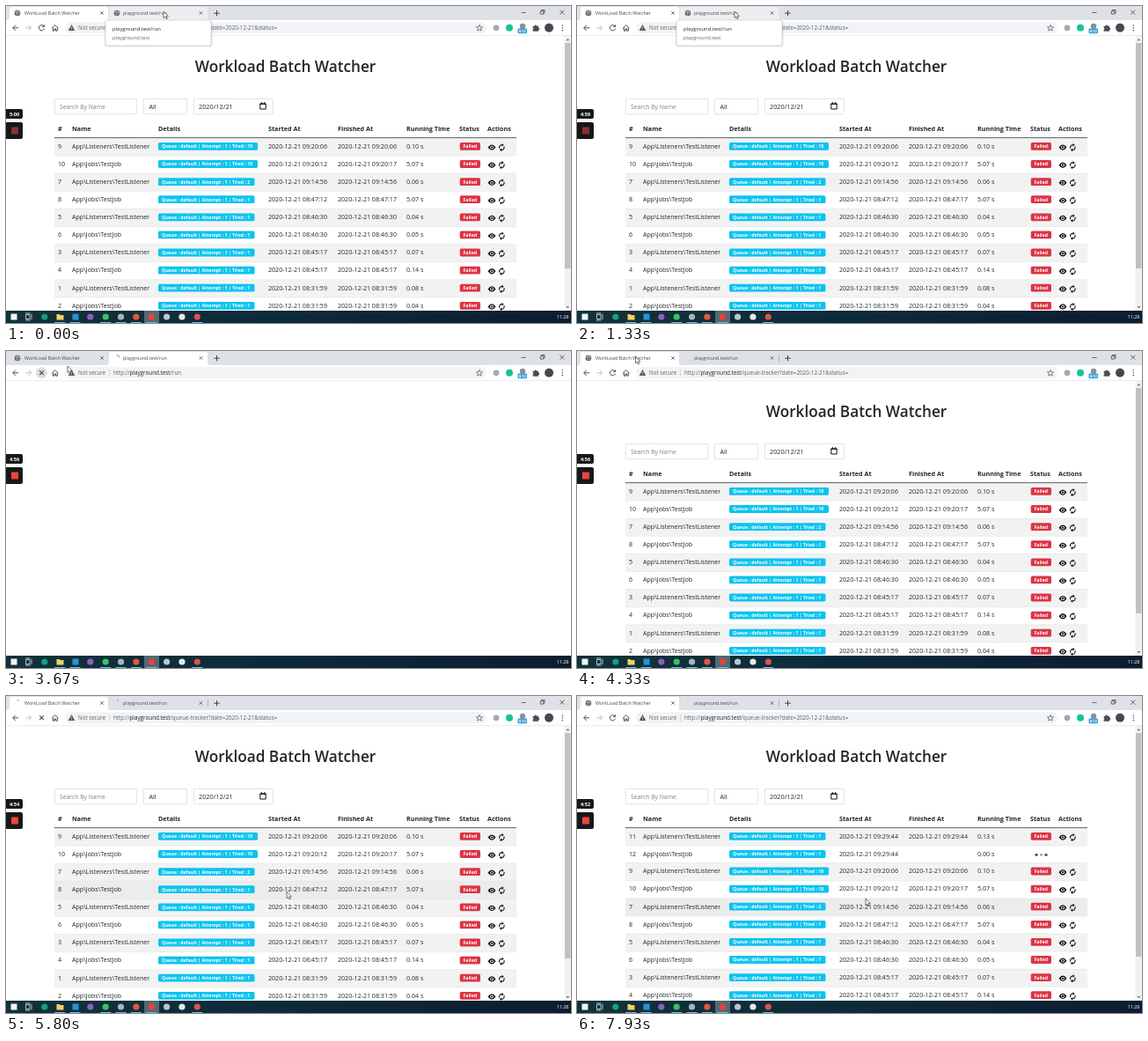
Recreate the animation shown at these times as an HTML page. Size 642 by 360 pixels, loop 8 s.

```html
<!DOCTYPE html>
<html lang="en">
<head>
<meta charset="utf-8">
<title>Queue page</title>
<style>
html, body { margin: 0; width: 100%; height: 100%; overflow: hidden; background: #fff; }
svg { display: block; width: 642px; height: 360px; font-family: "Open Sans", "Noto Sans", sans-serif; }
text { fill: #212529; font-size: 7.1px; white-space: pre; }
.b { font-weight: 700; font-size: 7.2px; }
.badge { font-weight: 700; font-size: 5.2px; fill: #fff; }
.tab { font-size: 5.35px; fill: #45494d; }
.url { font-size: 6.3px; fill: #5f6368; }
.host { fill: #202124; }
.line { fill: none; stroke: #4a4d51; stroke-width: 1; }
.thin { fill: none; stroke: #333; stroke-width: .7; }
.box { fill: #fff; stroke: #ced4da; stroke-width: .7; }
.spin { fill: none; stroke: #7d8794; stroke-width: .9; }
</style>
</head>
<body>
<svg viewBox="0 0 642 360">
  <defs>
    <linearGradient id="bar"><stop stop-color="#11323b"/><stop offset=".5" stop-color="#0d2a3a"/><stop offset="1" stop-color="#0d1d30"/></linearGradient>
    <g id="globe">
      <circle r="3.3" fill="#565a5f"/>
      <path d="M-2.6-.8L-.8-1.8 .2-.5-1 .6-.6 2.4M.8-2.6L1 -1.2 2.7-.6M1 1.8L2.2.8" fill="none" stroke="#f2f3f4" stroke-width=".8"/>
    </g>
    <path id="x" d="M-1.7-1.7L1.7 1.7M1.7-1.7L-1.7 1.7"/>
    <g id="eye">
      <path d="M-4.5 0Q0-6.4 4.5 0Q0 6.4-4.5 0Z" fill="#111"/>
      <circle r="1.9" fill="#fff"/><circle r="1.1" fill="#111"/>
    </g>
    <g id="again" fill="none" stroke="#111" stroke-width="1.1">
      <path d="M-2.6 1.2A2.9 2.9 0 0 1 .6-2.8M2.6-1.2A2.9 2.9 0 0 1-.6 2.8"/>
      <path d="M.2-4.6L2.4-2.8 .2-1ZM-.2 4.6L-2.4 2.8-.2 1Z" fill="#111" stroke="none"/>
    </g>
  </defs>

  <rect width="642" height="360" fill="#fff"/>

  <g id="page">
    <text x="317.5" y="75" text-anchor="middle" style="font-size:17.2px;font-weight:600">Workload Batch Watcher</text>
    <rect class="box" x="55.3" y="105.3" width="93.5" height="17.5" rx="1.8"/>
    <rect class="box" x="156.3" y="105.3" width="49.5" height="17.5" rx="1.8"/>
    <rect class="box" x="213.3" y="105.3" width="90" height="17.5" rx="1.8"/>
    <text x="61" y="116.5" style="font-size:6.8px;fill:#7b838a">Search By Name</text>
    <text x="162.5" y="116.5">All</text>
    <text x="219" y="116.5" style="font-size:7.3px">2020/12/21</text>
    <path d="M288.8 111h6.4v6h-6.4zM288.5 111.3h7" fill="none" stroke="#111" stroke-width="1"/>
    <path d="M290.3 109v2M293.7 109v2" stroke="#111" stroke-width=".9"/>
    <g id="head"></g>
    <g id="before"></g>
    <g id="after"></g>
    <path d="M55 149.6H580" stroke="#50565c" stroke-width=".9"/>
    <rect x="634.5" y="34" width="7.5" height="312" fill="#f1f1f1"/>
    <rect id="thumb" x="635" y="42" width="6.5" height="256" fill="#c1c1c1"/>
    <path d="M636.3 39.3L638.3 37 640.3 39.3ZM636.3 341L638.3 343.3 640.3 341Z" fill="#777"/>
  </g>

  <g id="status">
    <path d="M0 337H212Q214 337 214 339V346H0Z" fill="#dee1e6"/>
    <text x="2.5" y="343.7" style="font-size:5.9px;fill:#4d5156">Waiting for playground.test...</text>
  </g>

  <rect width="642" height="16" fill="#dee1e6"/>
  <path id="tab1" d="M2 16Q4 15 4 13V4Q4 1 7 1H113Q116 1 116 4V13Q116 15 118 16Z"/>
  <path id="tab2" d="M115 16Q117 15 117 13V4Q117 1 120 1H226Q229 1 229 4V13Q229 15 231 16Z"/>
  <use id="icon1" href="#globe" x="13" y="8"/>
  <use id="icon2" href="#globe" x="126" y="8"/>
  <circle id="spin1" class="spin" r="3.2" pathLength="100"/>
  <circle id="spin2" class="spin" r="3.2" pathLength="100"/>
  <text class="tab" x="21" y="10.2">WorkLoad Batch Watcher</text>
  <text class="tab" x="133" y="10.2">playground.test/run</text>
  <g class="thin">
    <use href="#x" x="109" y="8"/><use href="#x" x="221.5" y="8"/>
    <path id="edge" d="M229.5 4V12" stroke="#9a9da2"/>
    <path d="M236.3 8.2H242.7M239.5 5V11.4" stroke-width=".9"/>
    <path d="M585.5 7.5H590.5M607.3 5.7h3.4v3.4h-3.4zM608.5 5.5V4.5H612V8H611M629.3 4.7L634.3 9.7M634.3 4.7L629.3 9.7"/>
  </g>

  <rect y="16" width="642" height="17.5" fill="#fff"/>
  <path d="M0 33.6H642" stroke="#dfe1e4" stroke-width=".7"/>
  <rect x="67" y="18.3" width="479" height="13" rx="6.5" fill="#f1f3f4"/>
  <circle id="halo" cx="40.5" cy="24.8" r="6.5" fill="#dcdee1"/>
  <g class="line">
    <path d="M14 24.8H7.8M10.8 21.7L7.7 24.8 10.8 27.9"/>
    <path d="M22.3 24.8H28.5M25.5 21.7L28.6 24.8 25.5 27.9" stroke="#bcbfc3"/>
    <path id="reload" d="M43.1 23A3.1 3.1 0 1 0 43.5 25.7M43.6 21.3V23.6H41.2"/>
    <use id="stop" href="#x" transform="translate(40.5 24.8) scale(1.4)" stroke-width=".8"/>
    <path d="M52.2 25.2L55.8 21.6 59.4 25.2M53.3 24.5V28.2H55V26H56.6V28.2H58.3V24.5"/>
    <path d="M538 21.5l1 2.3 2.5.2-1.9 1.6.6 2.5-2.2-1.4-2.2 1.4.6-2.5-1.9-1.6 2.5-.2z" stroke-width=".7"/>
  </g>
  <path d="M74.5 21L78.3 28H70.7Z" fill="#55595e"/>
  <path d="M74.5 23.5V25.5M74.5 26.2V27" stroke="#f1f3f4" stroke-width=".7"/>
  <text class="url" x="82" y="27" style="font-size:6.2px">Not secure</text>
  <path d="M117.5 21V29" stroke="#c6c9cd" stroke-width=".7"/>
  <text class="url" x="122" y="27">http://<tspan class="host">playground.test</tspan><tspan id="path"></tspan></text>
  <circle cx="557" cy="24.8" r="3.4" fill="#a5a8ac"/>
  <circle cx="572" cy="24.8" r="4" fill="#15c39a"/>
  <circle cx="587" cy="23" r="3.2" fill="#8a9099"/>
  <rect x="581.5" y="25.5" width="10.5" height="5.8" rx="1" fill="#3aa0d8"/>
  <text x="586.8" y="30" text-anchor="middle" style="font-size:4px;font-weight:700;fill:#fff">8:12</text>
  <path d="M598.6 22.7h2a1.2 1.2 0 0 1 2.4 0h2v2a1.2 1.2 0 0 1 0 2.4v1.6h-6.4v-2a1.2 1.2 0 0 0 0-2.2z" fill="#4b4f54"/>
  <circle cx="617" cy="24.8" r="5" fill="#45484c"/>
  <g fill="#4a4d51"><circle cx="632.3" cy="22" r=".8"/><circle cx="632.3" cy="24.8" r=".8"/><circle cx="632.3" cy="27.6" r=".8"/></g>

  <g id="tip">
    <rect x="112" y="16.5" width="122.5" height="30" rx="3" fill="#000" opacity=".1"/>
    <rect x="113" y="16" width="120" height="29" rx="2.5" fill="#fff" stroke="#c3c6ca" stroke-width=".6"/>
    <text x="121" y="28" style="font-size:5.9px;font-weight:500">playground.test/run</text>
    <text x="121" y="37.5" style="font-size:5.8px;fill:#5f6368">playground.test</text>
  </g>

  <path d="M0 117H17Q19 117 19 119V126Q19 128 17 128H0ZM0 132H17Q19 132 19 134V149Q19 151 17 151H0Z" fill="#17181a"/>
  <text id="clock" x="9.5" y="124.6" text-anchor="middle" style="font-size:5.6px;font-weight:700;fill:#fff"></text>
  <rect id="rec" x="6" y="137.5" width="8" height="8" rx=".6"/>

  <rect y="346" width="642" height="14" fill="url(#bar)"/>
  <rect x="157" y="346" width="17" height="14" fill="#526a73"/>
  <rect x="5.5" y="349.5" width="7" height="7" fill="#f3f6f7"/>
  <path d="M22.5 350.5h4.5v5h-4.5zM29 349.8V356.2M22 349H27.5M22 357H27.5" fill="none" stroke="#dce3e6" stroke-width=".8"/>
  <path d="M57.5 350h3l1 1h4v5.5h-8z" fill="#f6cf63"/>
  <rect x="75.5" y="349.5" width="7" height="7" fill="#2593db"/>
  <g id="apps"></g>
  <text x="639.5" y="355.2" text-anchor="end" style="font-size:5.5px;fill:#fff">11:28</text>

  <path id="mouse" d="M0 0V7.6L1.8 6 3 8.7 4.2 8.2 3 5.6H5.4Z" fill="#fff" stroke="#222" stroke-width=".6"/>
</svg>
<script>
const $ = id => document.getElementById(id);
const make = (parent, tag, attrs, text) => {
  const node = document.createElementNS("http://www.w3.org/2000/svg", tag);
  for (const k in attrs) node.setAttribute(k, attrs[k]);
  if (text !== undefined) node.textContent = text;
  parent.append(node);
  return node;
};
const show = (id, on) => { $(id).style.display = on ? "" : "none"; };

const columns = { "#": 59, Name: 75, Details: 173, "Started At": 298, "Finished At": 377, "Running Time": 455, Status: 515, Actions: 547 };
for (const name in columns) make($("head"), "text", { class: "b", x: columns[name], y: 142.4 }, name);

// id, kind, tries, start, end, seconds
const jobs = `11 L 1 09:29:44 = 0.13
12 J 1 09:29:44 - 0.00
9 L 10 09:20:06 = 0.10
10 J 10 09:20:12 09:20:17 5.07
7 L 2 09:14:56 = 0.06
8 J 1 08:47:12 08:47:17 5.07
5 L 1 08:46:30 = 0.04
6 J 1 08:46:30 = 0.05
3 L 1 08:45:17 = 0.07
4 J 1 08:45:17 = 0.14
1 L 1 08:31:59 = 0.08
2 J 1 08:31:59 = 0.04`.split("\n").map(s => s.split(" "));

const dots = [];
function table(parent, list) {
  let top = 150;
  return list.map(([id, kind, tries, start, end, secs], i) => {
    const running = end === "-", h = running ? 19.5 : 20.1, y = top + 9.4;
    const color = i % 2 ? "#fff" : "#f2f2f2";
    const bg = make(parent, "rect", { x: 55, y: top, width: 525, height: h, fill: color });
    make(parent, "path", { d: `M55 ${top}H580`, stroke: "#dee2e6", "stroke-width": .6 });
    const write = (x, s) => make(parent, "text", { x, y: y + 2.3 }, s);
    const badge = (x, w, fill, s, pad) => {
      make(parent, "rect", { x, y: y - 4.4, width: w, height: 8.8, rx: 1.6, fill });
      make(parent, "text", { class: "badge", x: x + pad, y: y + 1.9 }, s);
    };
    write(59, id);
    write(75, kind === "L" ? "App\\Listeners\\TestListener" : "App\\Jobs\\TestJob");
    badge(173, 106 + 3.5 * tries.length, "#0cc3ef", `Queue : default | Attempt : 1 | Tried : ${tries}`, 4);
    write(298, "2020-12-21 " + start);
    if (!running) write(377, "2020-12-21 " + (end === "=" ? start : end));
    write(455, secs + " s");
    if (running) {
      for (let k = 0; k < 3; k++) dots.push(make(parent, "circle", { cx: 522 + 5.5 * k, cy: y + .8, r: 1.7, fill: "#333" }));
    } else {
      badge(515.7, 23.3, "#dc3545", "Failed", 3.8);
      make(parent, "use", { href: "#eye", x: 552, y: y + 1.2 });
      make(parent, "use", { href: "#again", x: 563.3, y: y + 1.2 });
    }
    const row = { bg, color, top, end: top + h };
    top += h;
    return row;
  });
}
const before = table($("before"), jobs.slice(2));
const after = table($("after"), jobs.slice(0, 10));

["#12a17a", "", "", "#8a5fc0", "#35c759", "#a9b4ba", "#e2583e", "#ea4335", "#b9c6d2", "#e6eaed", "#d9534f"].forEach((fill, i) => {
  const cx = 43.8 + 17.35 * i;
  if (fill) make($("apps"), "circle", { cx, cy: 353, r: 3.6, fill });
  if (i && i !== 3 && i < 8 || i === 10) make($("apps"), "rect", { x: cx - 6, y: 359, width: 12, height: 1, fill: "#76b9ed" });
});

// time, x, y of the pointer tip
const route = [
  [0, 179, 6], [1930, 179, 6], [2300, 54, 26], [2400, 54, 26], [2670, 39, 24], [3200, 39, 24],
  [3530, 70, 17], [3670, 70, 17], [4000, 66, 6], [4300, 66, 6], [4950, 140, 68], [5150, 140, 68],
  [5900, 328, 230], [8000, 328, 230]
];
function pointer(t) {
  const i = route.findIndex(p => p[0] > t), [t0, x0, y0] = route[i - 1], [t1, x1, y1] = route[i];
  const u = (t - t0) / (t1 - t0), e = u * u * (3 - 2 * u);
  return [x0 + (x1 - x0) * e, y0 + (y1 - y0) * e];
}

function spin(id, x, t) {
  const len = 22 + 18 * Math.cos((t - 5130) / 1870 * 2 * Math.PI);
  const turn = 180 + (t - 5130) * .1607 - len * 1.8;
  $(id).setAttribute("stroke-dasharray", `${len} ${100 - len}`);
  $(id).setAttribute("transform", `translate(${x} 8) rotate(${turn})`);
}

const TAB2 = 1400, RELOAD = 3200, TAB1 = 4050, REFRESH = 5470, LOADED = 6000;
function draw(t) {
  const [x, y] = pointer(t);
  const second = t >= TAB2 && t < TAB1;
  const busy1 = t >= REFRESH && t < LOADED, busy2 = t >= RELOAD;
  const fresh = t >= LOADED;

  $("mouse").setAttribute("transform", `translate(${x} ${y})`);
  show("page", !second);
  show("before", !fresh);
  show("after", fresh);
  $("thumb").setAttribute("height", fresh ? 254 : 256);
  for (const row of fresh ? after : before) {
    const hover = x > 55 && x < 580 && y >= row.top && y < row.end;
    row.bg.setAttribute("fill", hover ? "#ececec" : row.color);
  }

  $("tab1").setAttribute("fill", second ? "#dee1e6" : "#fff");
  $("tab2").setAttribute("fill", second ? "#fff" : t < TAB2 ? "#eceef1" : "#dee1e6");
  show("edge", !second && t >= TAB2);
  show("tip", t < TAB2);
  $("path").textContent = second ? "/run" : "/queue-tracker?date=2020-12-21&status=";

  show("icon1", !busy1);
  show("spin1", busy1);
  show("icon2", !busy2);
  show("spin2", busy2);
  spin("spin1", 13, t);
  spin("spin2", 126, t);

  const stop = busy1 || busy2 && second;
  show("stop", stop);
  show("reload", !stop);
  show("halo", t >= 2600 && t < TAB1);
  show("status", t >= 6350 && t < 6900);

  const left = 300 - Math.floor((t + 600) / 1000);
  $("clock").textContent = Math.floor(left / 60) + ":" + String(left % 60).padStart(2, "0");
  $("rec").setAttribute("fill", t < 3000 ? "#8c2f33" : "#f04438");

  const phase = (t - 7930) / 933 * 2 * Math.PI + 5.14;
  dots.forEach((dot, i) => {
    const wave = Math.cos(phase - 2 * i);
    dot.setAttribute("opacity", .75 + .25 * wave);
    dot.setAttribute("r", 1.55 + .2 * wave);
  });
}

const begin = performance.now();
function tick() {
  draw((performance.now() - begin) % 8000);
  requestAnimationFrame(tick);
}
tick();
</script>
</body>
</html>
```
